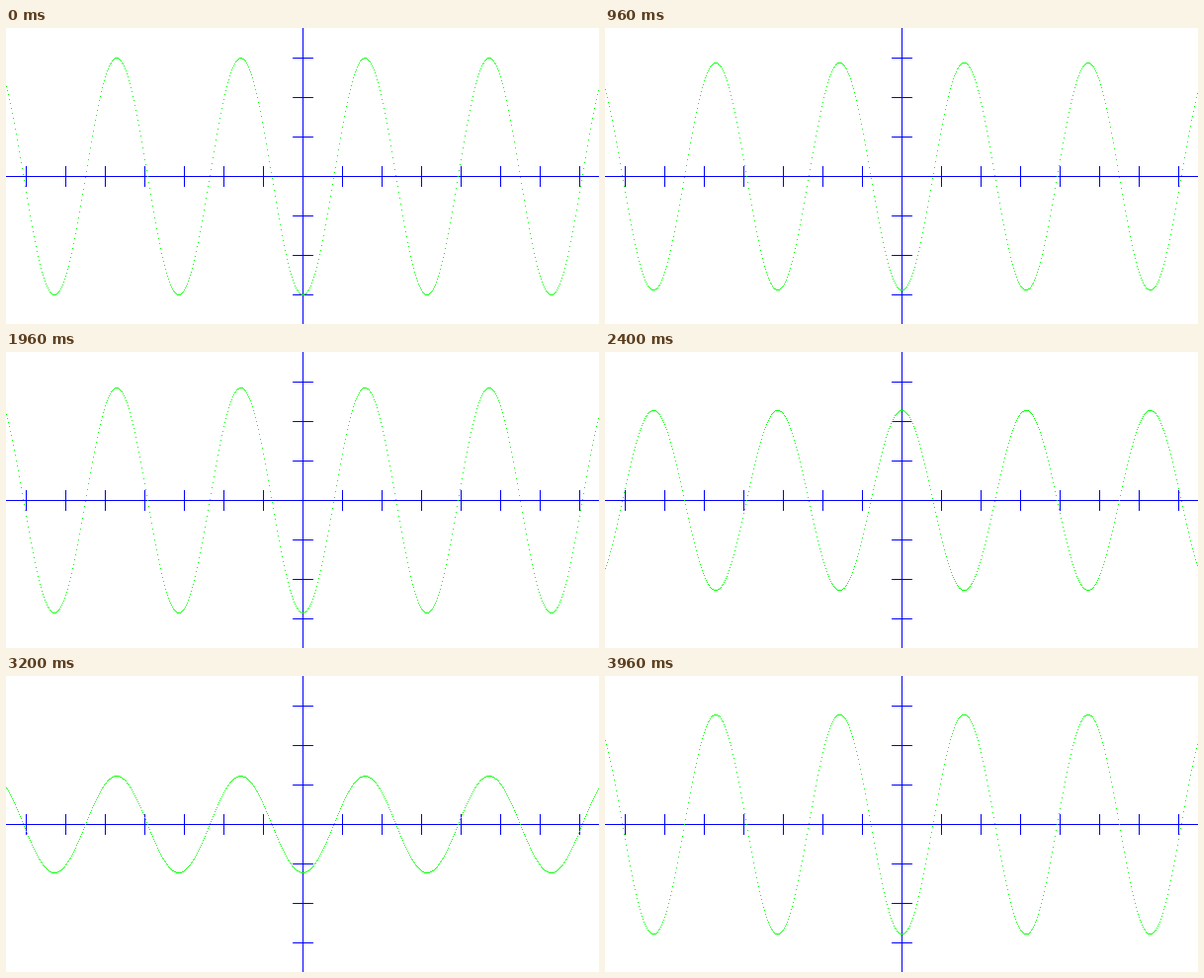
A matplotlib script that plays this animation: 600x300 px, repeating every 4 s.

```python
import numpy as np
import matplotlib.pyplot as plt
from matplotlib.animation import FuncAnimation

W, H, DPI = 600, 300, 100
CX, CY = W // 2, H // 2
UNIT = 40          # pixels per axis unit
TICK = 10          # half length of a tick
AMP = 3 * UNIT
FRAMES, INTERVAL = 100, 40
STEP = 0.25        # phase advance per frame

WHITE, BLUE, GREEN = (255, 255, 255), (0, 0, 255), (0, 255, 0)


def make_axes():
    img = np.empty((H, W, 3), dtype=np.uint8)
    img[:] = WHITE
    img[CY, :] = BLUE
    img[:, CX] = BLUE
    for x in range(CX % UNIT, W, UNIT):
        img[CY - TICK:CY + TICK + 1, x] = BLUE
    for y in range(CY % UNIT, H, UNIT):
        img[y, CX - TICK:CX + TICK + 1] = BLUE
    return img


base = make_axes()
cols = np.arange(W)
shape = np.cos(2 * (cols - CX) / UNIT)


def wave_image(n):
    """Standing wave, one dot per pixel column."""
    img = base.copy()
    y = CY + AMP * np.cos(STEP * n) * shape
    img[np.rint(y).astype(int), cols] = GREEN
    return img


fig = plt.figure(figsize=(W / DPI, H / DPI), dpi=DPI, facecolor="white")
ax = fig.add_axes([0, 0, 1, 1])
ax.axis("off")
view = ax.imshow(wave_image(0), interpolation="nearest", aspect="auto")


def init():
    view.set_data(wave_image(0))
    return (view,)


def update(n):
    view.set_data(wave_image(n))
    return (view,)


anim = FuncAnimation(fig, update, frames=FRAMES, init_func=init,
                     interval=INTERVAL, repeat=True, repeat_delay=0)
plt.show()
```
